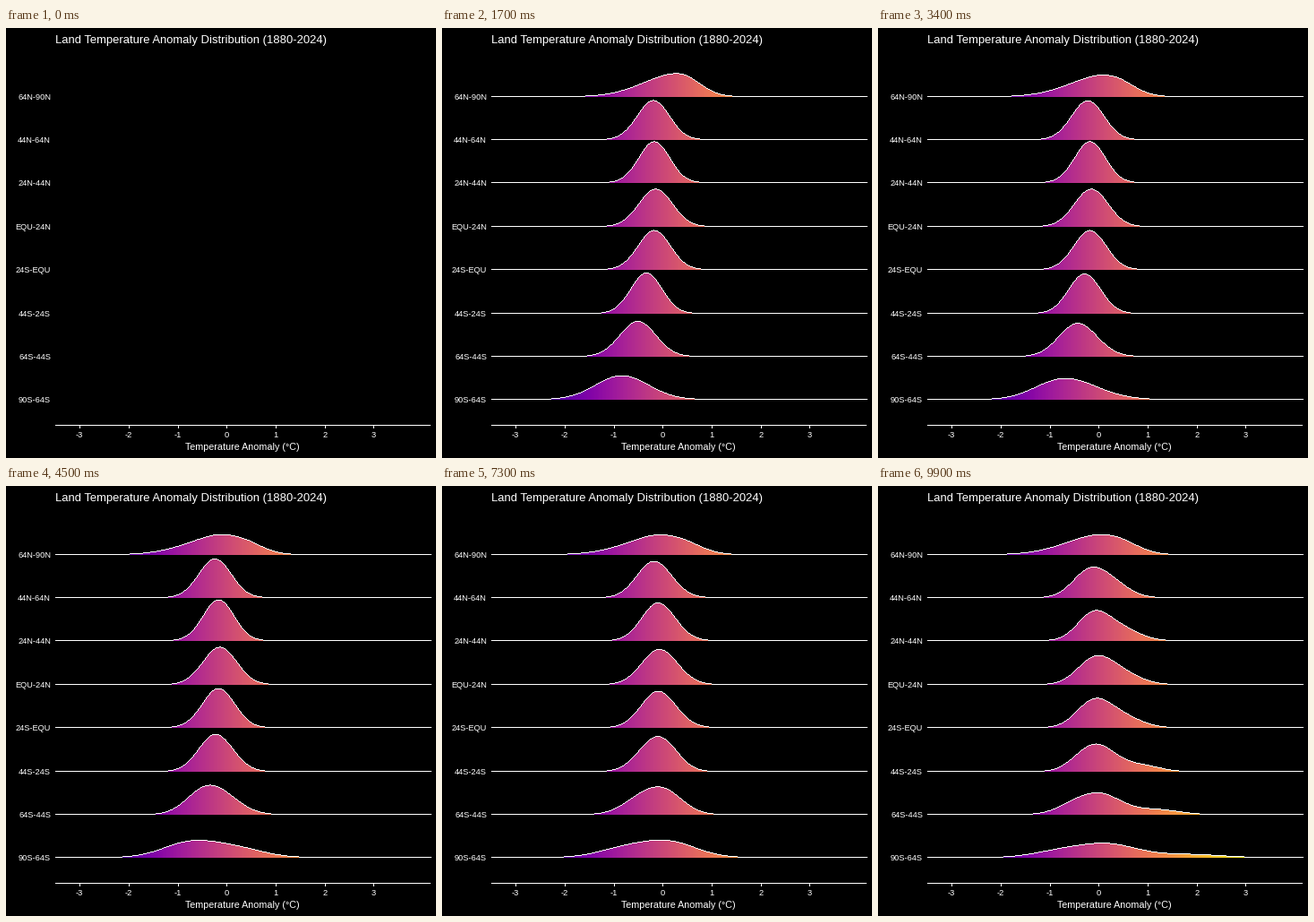
Recreate the animation shown at these times as a matplotlib script. Size 480 by 480 pixels, loop 10000 ms.

```python
import numpy as np
import matplotlib.pyplot as plt
from matplotlib.animation import FuncAnimation

SIZE = 480
FRAMES = 100
LEFT, RIGHT = 55, 475
ZERO, UNIT = 246.7, 54.7      # pixel of 0 °C, pixels per °C
HEIGHT = 14.44                # peak height in px of a curve with spread 1 °C
FIRST = 2                     # ridges need three years of data
AXIS = 443

# name: anomaly at the start, late warming, swing, cold and warm spread
BANDS = {
    "64N-90N": (.05, .50, -.40, .70, .40),
    "44N-64N": (-.22, .80, -.07, .33, .33),
    "24N-44N": (-.15, .95, 0, .315, .315),
    "EQU-24N": (-.12, .90, 0, .345, .345),
    "24S-EQU": (-.15, .95, 0, .33, .33),
    "44S-24S": (-.20, 1.2, .15, .315, .315),
    "64S-44S": (-.30, 1.6, .25, .36, .36),
    "90S-64S": (-.40, 2.2, .55, .52, .52),
}
BASES = [round(75.75 + 48.36 * i) for i in range(len(BANDS))]

cols = np.arange(LEFT, RIGHT)
deg = (cols + .5 - ZERO) / UNIT
rows = np.arange(SIZE)[:, None]
plasma = plt.get_cmap("plasma")((deg + 3.1) / 6.2)


def anomaly(u, start, warming, swing):
    """Typical anomaly at share u of the record: dip, swing and warming."""
    return (start + warming * u ** 2 - .15 * np.sin(np.pi * u)
            + swing * np.cos(2 * np.pi * (u - .42) / .58))


def running_density(start, warming, swing, cold, warm):
    """Ridge height per frame: the mean of all yearly curves so far."""
    u = np.linspace(0, 1, FRAMES)[:, None]
    d = deg - anomaly(u, start, warming, swing)
    spread = np.where(d < 0, cold, warm)
    yearly = 2 * HEIGHT / (cold + warm) * np.exp(-(d / spread) ** 2 / 2)
    return yearly.cumsum(axis=0) / np.arange(1, FRAMES + 1)[:, None]


ridges = [running_density(*band) for band in BANDS.values()]

plt.rcParams["font.family"] = "Liberation Sans"
fig = plt.figure(figsize=(SIZE / 72, SIZE / 72), dpi=72, facecolor="black")
ax = fig.add_axes([0, 0, 1, 1])


def label(x, y, text, size, ha="center"):
    ax.text(x, y, text, size=size, color="white", ha=ha, va="baseline")


label(55, 17, "Land Temperature Anomaly Distribution (1880-2024)", 13, "left")
label(264, 471, "Temperature Anomaly (°C)", 10.8)
for name, base in zip(BANDS, BASES):
    label(50, base + 4, name, 9.3, "right")

stage = np.zeros((SIZE, SIZE, 4))
stage[..., 3] = 1
stage[AXIS, LEFT:RIGHT - 1] = 1
for value in range(-3, 4):
    x = int(ZERO + value * UNIT)
    stage[AXIS:AXIS + 4, x] = 1
    label(x, 457, str(value), 9.3)

picture = ax.imshow(stage, extent=(0, SIZE, SIZE, 0), aspect="auto",
                    interpolation="nearest")
ax.set(xlim=(0, SIZE), ylim=(SIZE, 0))
ax.axis("off")


def paint_ridge(area, base, height):
    """Gradient below the curve and a one-pixel outline on it."""
    top = np.floor(base + .7 - height)
    last = np.concatenate([top[:1], top[:-1]])
    inside = (rows >= top) & (rows <= base)
    edge = ((rows >= np.minimum(top, last + 1))
            & (rows <= np.maximum(top, last - 1)))
    area[:] = np.where(inside[..., None], plasma, area)
    area[edge] = 1


def draw(frame):
    image = stage.copy()
    if frame >= FIRST:
        for base, ridge in zip(BASES, ridges):
            paint_ridge(image[:, LEFT:RIGHT], base, ridge[frame])
    picture.set_data(image)
    return [picture]


anim = FuncAnimation(fig, draw, frames=FRAMES, interval=100,
                     repeat=True, repeat_delay=0)
plt.show()
```
